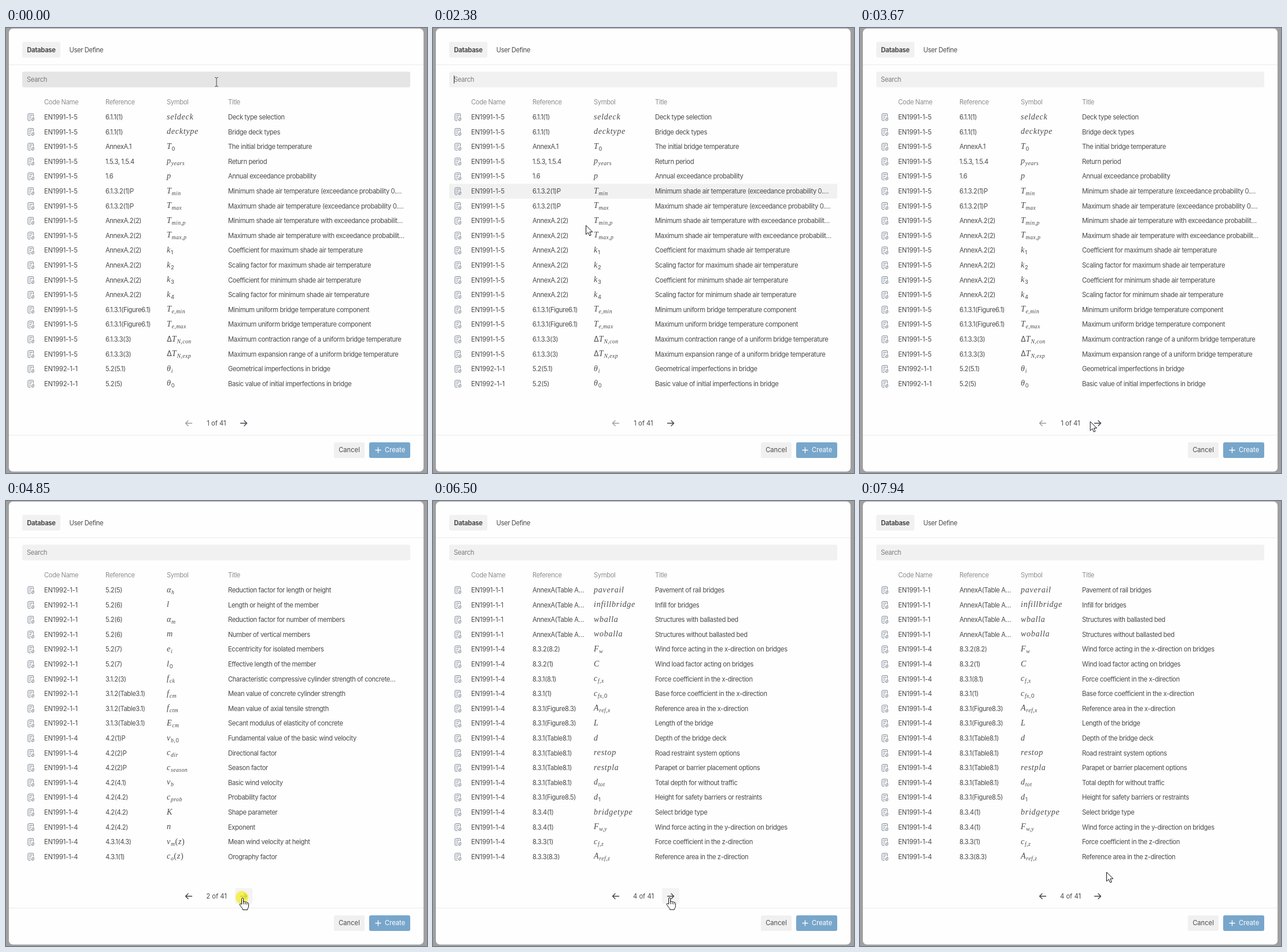
Write an HTML page that moves like this. It is 728 px wide and 769 px high and loops after 8 s.

```html
<!DOCTYPE html>
<html lang="en">
<head>
<meta charset="utf-8">
<title>Database picker</title>
<style>
html, body { margin: 0; width: 100%; height: 100%; overflow: hidden; background: #a0a0a0; }
svg { display: block; width: 100vw; height: 100vh; }
text { font: 11.2px Inter, sans-serif; letter-spacing: -.365px; fill: #4a4a4a; white-space: pre; }
.head, .hint { fill: #8e8e8e; }
.hint { fill: #7b7b7b; }
.tab { font-weight: 700; letter-spacing: -.3px; }
.code { letter-spacing: -.19px; }
.label { letter-spacing: 0; }
.math { font: italic 14px "Liberation Serif", serif; letter-spacing: .75px; }
.sub { font-size: 9.8px; letter-spacing: .4px; }
.up { font-style: normal; }
.num { font: 13px Inter, sans-serif; letter-spacing: 0; }
.sub.num { font-size: 9.4px; }
.line { fill: none; stroke-linecap: round; stroke-linejoin: round; }
</style>
</head>
<body>
<svg viewBox="0 0 728 769" preserveAspectRatio="none">
  <defs>
    <g id="doc" class="line" stroke="#737d8b" stroke-width="1">
      <path d="M-1 6H-3.5Q-5 6-5 4.5V-4.5Q-5-6-3.5-6H3Q4.5-6 4.5-4.5V-1.5"/>
      <path d="M-2.5-3H2.5M-2.5 0H.5M-2.5 3H-1"/>
      <path d="M1 3V4.5Q1 6 3 6T5.2 4.5V2Q5.2.5 4.2.5T3 2V4"/>
    </g>
    <path id="arrow" class="line" d="M-5.5 0H5.5M1 -4.5L5.5 0L1 4.5" stroke-width="1.4"/>
  </defs>
  <rect x="5" y="1" width="717" height="765.5" rx="7" fill="#fefefe"/>
  <path d="M5 63.5H722M5 703.5H722" stroke="#ebebeb"/>
  <rect x="28" y="24" width="66" height="27" rx="3" fill="#f1f1f1"/>
  <text class="tab" x="61" y="42" text-anchor="middle">Database</text>
  <text x="109.5" y="42">User Define</text>
  <rect id="search" x="28" y="75.5" width="671" height="27" rx="3"/>
  <text class="hint" x="36" y="93">Search</text>
  <path id="caret" d="M36.5 82V96" stroke="#333"/>
  <g id="heads"></g>
  <rect id="hover" x="28" width="671" height="25.6" rx="2" fill="#f1f1f1"/>
  <g id="pages"></g>
  <rect id="nextBg" x="396" y="669" width="30" height="27" rx="3" fill="#f3f3f3"/>
  <use id="prev" href="#arrow" transform="translate(316 683) scale(-1 1)"/>
  <use href="#arrow" transform="translate(411 683)" stroke="#3f4652"/>
  <text id="count" class="label" x="364" y="687" text-anchor="middle"></text>
  <rect x="567" y="716" width="53" height="27" rx="3" fill="#f0f0f0"/>
  <text class="label" x="593.5" y="733" text-anchor="middle">Cancel</text>
  <rect x="628" y="716" width="71" height="27" rx="3" fill="#78a6cb"/>
  <path d="M638.5 729.5H648.5M643.5 724.5V734.5" stroke="#fff" stroke-width="1.3"/>
  <text class="label" x="655" y="733" style="fill:#fff">Create</text>
  <circle id="glow" r="11" fill="#f4ee2c"/>
  <g id="ibeam" class="line" stroke="#444"><path d="M-2.5-7.5H-1L0-6.5L1-7.5H2.5M0-6.5V7M-2.5 8H-1L0 7L1 8H2.5"/></g>
  <path id="pointer" d="M.5 .5V16.2L4.2 12.8L6.7 18.4L9.2 17.3L6.8 11.8H11.8Z" fill="#fff" stroke="#111" stroke-linejoin="round"/>
  <path id="hand" d="M-1.5 11V1.5Q-1.5 0 0 0T1.5 1.5V7Q1.8 5.8 3.2 6T4.6 7.6Q5.2 6.5 6.5 6.8T7.6 8.5Q8.3 7.7 9.4 8.2T10.5 10V14Q10.5 17 8.5 19V20.5H.5V19L-3 14.5Q-5.5 11.5-4.7 10.3T-1.5 11M1.5 7V11M4.6 8V11M7.6 9V11.5" fill="#fff" stroke="#111" stroke-linejoin="round"/>
</svg>
<script>
const LOOP = 8000, ROW = 25.6, TOP = 154, LAG = 80;
const COLS = [66, 172, 278, 384];
const $ = id => document.getElementById(id);

const pages = [`
EN1991-1-5|6.1.1(1)|seldeck|Deck type selection
EN1991-1-5|6.1.1(1)|decktype|Bridge deck types
EN1991-1-5|AnnexA.1|T_0|The initial bridge temperature
EN1991-1-5|1.5.3, 1.5.4|p_years|Return period
EN1991-1-5|1.6|p|Annual exceedance probability
EN1991-1-5|6.1.3.2(1)P|T_min|Minimum shade air temperature (exceedance probability 0.…
EN1991-1-5|6.1.3.2(1)P|T_max|Maximum shade air temperature (exceedance probability 0.…
EN1991-1-5|AnnexA.2(2)|T_min,p|Minimum shade air temperature with exceedance probabilit…
EN1991-1-5|AnnexA.2(2)|T_max,p|Maximum shade air temperature with exceedance probabilit…
EN1991-1-5|AnnexA.2(2)|k_1|Coefficient for maximum shade air temperature
EN1991-1-5|AnnexA.2(2)|k_2|Scaling factor for maximum shade air temperature
EN1991-1-5|AnnexA.2(2)|k_3|Coefficient for minimum shade air temperature
EN1991-1-5|AnnexA.2(2)|k_4|Scaling factor for minimum shade air temperature
EN1991-1-5|6.1.3.1(Figure6.1)|T_e,min|Minimum uniform bridge temperature component
EN1991-1-5|6.1.3.1(Figure6.1)|T_e,max|Maximum uniform bridge temperature component
EN1991-1-5|6.1.3.3(3)|ΔT_N,con|Maximum contraction range of a uniform bridge temperature
EN1991-1-5|6.1.3.3(3)|ΔT_N,exp|Maximum expansion range of a uniform bridge temperature
EN1992-1-1|5.2(5.1)|θ_i|Geometrical imperfections in bridge
EN1992-1-1|5.2(5)|θ_0|Basic value of initial imperfections in bridge`, `
EN1992-1-1|5.2(5)|α_h|Reduction factor for length or height
EN1992-1-1|5.2(6)|l|Length or height of the member
EN1992-1-1|5.2(6)|α_m|Reduction factor for number of members
EN1992-1-1|5.2(6)|m|Number of vertical members
EN1992-1-1|5.2(7)|e_i|Eccentricity for isolated members
EN1992-1-1|5.2(7)|l_0|Effective length of the member
EN1992-1-1|3.1.2(3)|f_ck|Characteristic compressive cylinder strength of concrete…
EN1992-1-1|3.1.2(Table3.1)|f_cm|Mean value of concrete cylinder strength
EN1992-1-1|3.1.2(Table3.1)|f_ctm|Mean value of axial tensile strength
EN1992-1-1|3.1.3(Table3.1)|E_cm|Secant modulus of elasticity of concrete
EN1991-1-4|4.2(1)P|v_b,0|Fundamental value of the basic wind velocity
EN1991-1-4|4.2(2)P|c_dir|Directional factor
EN1991-1-4|4.2(2)P|c_season|Season factor
EN1991-1-4|4.2(4.1)|v_b|Basic wind velocity
EN1991-1-4|4.2(4.2)|c_prob|Probability factor
EN1991-1-4|4.2(4.2)|K|Shape parameter
EN1991-1-4|4.2(4.2)|n|Exponent
EN1991-1-4|4.3.1(4.3)|v_m(z)|Mean wind velocity at height
EN1991-1-4|4.3.1(1)|c_o(z)|Orography factor`, `
EN1991-1-4|4.3.2(4.4)|c_r(z)|Terrain roughness factor for mean wind velocity
EN1991-1-4|4.3.2(Table4.1)|terrain|Terrain category selection
EN1991-1-4|4.3.2(Table4.1)|z_0|Roughness length for terrain
EN1991-1-4|4.3.2(Table4.1)|z_min|Minimum height for roughness factor calculation
EN1991-1-4|4.3.2(4.5)|k_r|Terrain factor for roughness calculation
EN1991-1-4|4.3.2(Table4.1)|z_0,II|Reference roughness length for terrain category II
EN1991-1-4|4.3.2(1)|z_max|Maximum height for roughness factor calculation
EN1991-1-4|4.5(4.8)|σ_v|Standard deviation of wind turbulence
EN1991-1-4|4.4(1)|k_l|Turbulence factor
EN1991-1-4|4.4(4.7)|I_v(z)|Turbulence intensity at height
EN1991-1-4|4.5(4.8)|q_p(z)|Peak velocity pressure at height
EN1991-1-4|4.5(1)|ρ|Air density during wind storms
EN1991-1-4|4.5(4.9)|c_e(z)|Exposure factor at heigh
EN1991-1-4|4.5(4.10)|q_b|Basic velocity pressure
EN1991-1-1|AnnexA|densitytype|Density Type
EN1991-1-1|AnnexA|g|Gravity acceleration
EN1991-1-1|AnnexA|kntokg|kN to kg unit converter
EN1991-1-1|AnnexA(Table A.1)|conmater|Density of concrete material
EN1991-1-1|AnnexA(Table A…|paveroad|Pavement of road bridges`, `
EN1991-1-1|AnnexA(Table A…|paverail|Pavement of rail bridges
EN1991-1-1|AnnexA(Table A…|infillbridge|Infill for bridges
EN1991-1-1|AnnexA(Table A…|wballa|Structures with ballasted bed
EN1991-1-1|AnnexA(Table A…|woballa|Structures without ballasted bed
EN1991-1-4|8.3.2(8.2)|F_w|Wind force acting in the x-direction on bridges
EN1991-1-4|8.3.2(1)|C|Wind load factor acting on bridges
EN1991-1-4|8.3.1(8.1)|c_f,x|Force coefficient in the x-direction
EN1991-1-4|8.3.1(1)|c_fx,0|Base force coefficient in the x-direction
EN1991-1-4|8.3.1(Figure8.3)|A_ref,x|Reference area in the x-direction
EN1991-1-4|8.3.1(Figure8.3)|L|Length of the bridge
EN1991-1-4|8.3.1(Table8.1)|d|Depth of the bridge deck
EN1991-1-4|8.3.1(Table8.1)|restop|Road restraint system options
EN1991-1-4|8.3.1(Table8.1)|restpla|Parapet or barrier placement options
EN1991-1-4|8.3.1(Table8.1)|d_tot|Total depth for without traffic
EN1991-1-4|8.3.1(Figure8.5)|d_1|Height for safety barriers or restraints
EN1991-1-4|8.3.4(1)|bridgetype|Select bridge type
EN1991-1-4|8.3.4(1)|F_w,y|Wind force acting in the y-direction on bridges
EN1991-1-4|8.3.3(1)|c_f,z|Force coefficient in the z-direction
EN1991-1-4|8.3.3(8.3)|A_ref,z|Reference area in the z-direction`
].map(p => p.trim().split("\n").map(r => r.split("|")));

const text = (x, y, s, cls = "") => `<text class="${cls}" x="${x}" y="${y}">${s}</text>`;

// "T_min" becomes an italic T with a lowered "min"; digits and brackets stand upright
function symbol(s) {
  let shift = 0;
  return s.split(/_(\w[\w,]*)/).map((part, i) => {
    const low = i % 2 ? 3 : 0;
    return part.split(/([\dΔ]+|[()])/).filter(Boolean).map(run => {
      const cls = /[\dΔ]/.test(run) ? "num" : /[()]/.test(run) ? "up" : "";
      const dy = low - shift;
      shift = low;
      return `<tspan class="math ${low ? "sub" : ""} ${cls}" dy="${dy}">${run}</tspan>`;
    }).join("");
  }).join("");
}

$("heads").innerHTML = ["Code Name", "Reference", "Symbol", "Title"]
  .map((s, i) => text(COLS[i], 132, s, "head")).join("");

$("pages").innerHTML = pages.map(rows => "<g>" + rows.map(([code, ref, sym, title], i) => {
  const y = TOP + i * ROW;
  return `<use href="#doc" x="43" y="${y}"/>`
    + text(COLS[0], y + 4, code, "code")
    + text(COLS[1], y + 4, ref)
    + text(COLS[2], y + 3.5, symbol(sym), "math")
    + text(COLS[3], y + 4, title);
}).join("") + "</g>").join("");
const sheets = [...$("pages").children];

// mouse path: time, x, y
const path = [
  [0, 364, 93], [180, 364, 93], [420, 340, 150], [620, 310, 222], [980, 284, 410],
  [1080, 284, 410], [1240, 284, 401], [1320, 283, 387], [1850, 262, 205], [1990, 262, 205],
  [2290, 262, 282], [2380, 264, 340], [2780, 292, 578], [2810, 292, 578], [3000, 304, 628],
  [3570, 384, 668], [3669, 384, 668], [3670, 397.5, 679.5], [3830, 409, 690], [3969, 409, 690],
  [3970, 409, 686], [6490, 409, 686], [6900, 400, 470], [7110, 400, 420], [7210, 399, 405],
  [7300, 400, 428], [7390, 400, 428], [7940, 426, 641], [8000, 426, 641]
];
const clicks = [[3970, 350], [4850, 280], [5710, 220]];
const blinks = [[300, 830], [1360, 1850], [2350, 2780], [3050, 3570]];

// slope through a key; zero beside a rest or at a turning point
function slope(i, k) {
  const a = path[i - 1], b = path[i], c = path[i + 1];
  if (!a || !c) return 0;
  const l = (b[k] - a[k]) / (b[0] - a[0]), r = (c[k] - b[k]) / (c[0] - b[0]);
  return l * r <= 0 ? 0 : 2 * l * r / (l + r);
}

function mouse(t) {
  t = Math.max(0, t);
  let i = 0;
  while (i < path.length - 2 && path[i + 1][0] <= t) i++;
  const a = path[i], b = path[i + 1], d = b[0] - a[0], u = (t - a[0]) / d;
  const s = u * u * (3 - 2 * u);
  return [1, 2].map(k => a[k] + (b[k] - a[k]) * s
    + d * (slope(i, k) * u * (1 - u) ** 2 - slope(i + 1, k) * u * u * (1 - u)));
}

const inside = ([x, y], l, t, r, b) => x >= l && x <= r && y >= t && y <= b;
const show = (id, on) => $(id).style.display = on ? "" : "none";

function draw(t) {
  const pos = mouse(t), seen = mouse(t - LAG);
  const inSearch = inside(seen, 28, 75, 699, 103);
  const onNext = inside(seen, 396, 669, 426, 696);
  const row = Math.floor((seen[1] - TOP) / ROW + .5);
  const page = clicks.filter(([start]) => t >= start + 90).length;

  $("search").setAttribute("fill", inSearch ? "#e5e5e5" : "#f1f1f1");
  show("caret", blinks.some(([a, b]) => t >= a && t < b));
  show("hover", row >= 0 && row < 19);
  $("hover").setAttribute("y", TOP + (row - .5) * ROW);
  sheets.forEach((g, i) => g.style.display = i === page ? "" : "none");
  $("count").textContent = `${page + 1} of 41`;
  $("prev").setAttribute("stroke", page ? "#3f4652" : "#9a9da3");
  show("nextBg", onNext);

  const click = clicks.find(([start, len]) => t >= start && t < start + len);
  show("glow", click);
  if (click) {
    const fade = Math.max(0, (t - click[0] - 100) / (click[1] - 100));
    $("glow").setAttribute("opacity", .78 * (1 - fade));
    $("glow").setAttribute("transform", `translate(${pos[0] - 1} ${pos[1] - 1})`);
  }

  const kind = inSearch ? "ibeam" : onNext ? "hand" : "pointer";
  for (const id of ["ibeam", "hand", "pointer"]) {
    show(id, id === kind);
    $(id).setAttribute("transform", `translate(${pos[0]} ${pos[1]})`);
  }
}

const begin = performance.now();
function tick() {
  draw((performance.now() - begin) % LOOP);
  requestAnimationFrame(tick);
}
tick();
</script>
</body>
</html>
```
